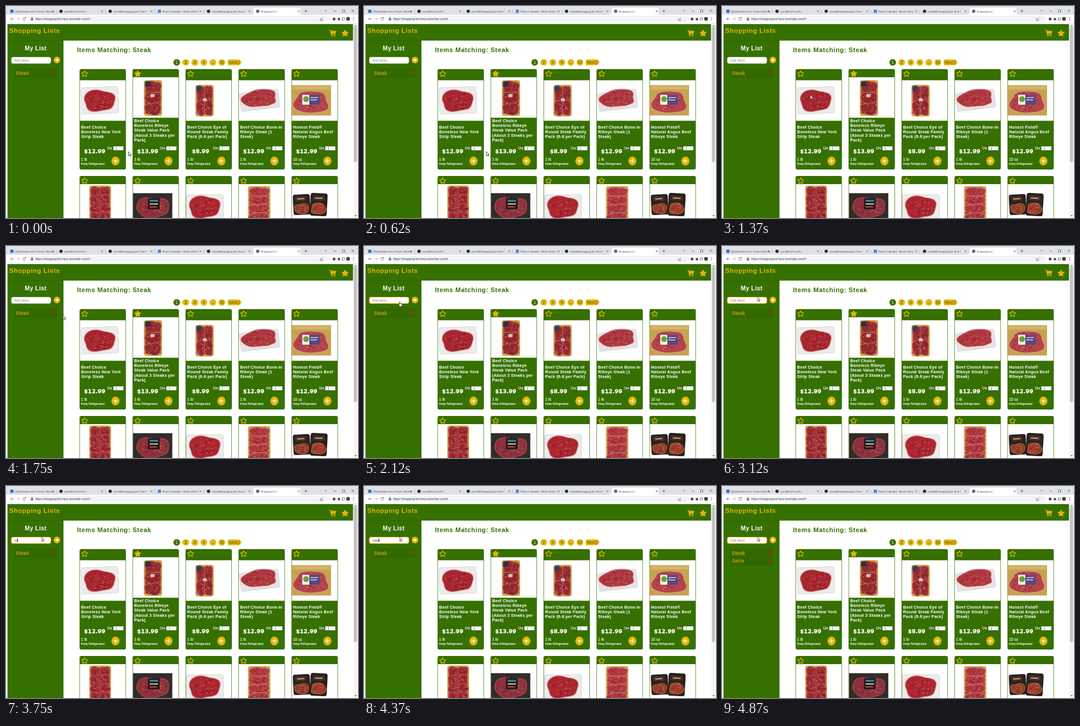
An HTML page for the animation above (4.99 s loop, 600x363 px).

```html
<!DOCTYPE html>
<html lang="en">
<head>
<meta charset="utf-8">
<title>Shopping List</title>
<style>
  html, body { margin: 0; width: 100%; height: 100%; overflow: hidden; background: #fff; }
  svg { display: block; width: 600px; height: 363px; }
  text { font-family: "Liberation Sans", Arial, sans-serif; fill: #fff; white-space: pre; }
  .tab { font-size: 4.4px; fill: #3c4043; }
  .url { font-size: 5.15px; fill: #3a3d40; }
  .brand { font: bold 11px "Liberation Sans", Arial, sans-serif; letter-spacing: .5px; fill: #e3b505; }
  .heading { font: bold 11px "Liberation Sans", Arial, sans-serif; letter-spacing: .5px; fill: #367000; }
  .side { font: bold 10px "Liberation Sans", Arial, sans-serif; letter-spacing: .4px; }
  .item { font-size: 8.3px; letter-spacing: .35px; fill: #e3b505; stroke: #e3b505; stroke-width: .12px; }
  .page { font-size: 7px; fill: #4c5a08; text-anchor: middle; }
  .name { font: bold 7px "Liberation Sans", Arial, sans-serif; letter-spacing: .2px; }
  .price { font: bold 9.4px "DejaVu Sans", Verdana, sans-serif; text-anchor: middle; stroke: #fff; stroke-width: .25px; }
  .qty, .unit, .note { stroke: #fff; stroke-width: .12px; }
  .qty { font-size: 6px; }
  .count { font-size: 5px; fill: #333; }
  .unit { font-size: 6.4px; }
  .note { font-size: 4.7px; letter-spacing: .1px; }
  .line { fill: none; stroke: #5f6368; stroke-width: .8; }
  .star { fill: none; stroke: #e3b505; stroke-width: 1.2; stroke-linejoin: round; }
  .star.on { fill: #e3b505; }
  .cross { stroke: #d8122a; stroke-width: 1.9; }

  #field { position: absolute; left: 14.6px; top: 89px; height: 8px; font: 5.1px/8px "Liberation Sans", Arial, sans-serif; letter-spacing: .2px; color: #333; }
  #hint { position: absolute; left: 0; top: 0; white-space: nowrap; color: #777; }
  #typed { position: absolute; left: 0; top: 0; overflow: hidden; letter-spacing: 0; width: 0; }
  #caret { position: absolute; left: 0; top: 1px; width: .6px; height: 6px; background: #222; }

  /* 40 ticks per loop: one tick is 2.5% */
  .run { animation: 4990ms step-end -5ms infinite; }
  #mouse { animation-name: move; }
  #arrow { animation-name: arrow; }
  #hand { animation-name: hand; }
  #ring { animation-name: ring; }
  #added { animation-name: added; }
  #hint { animation-name: hint; }
  #typed { animation-name: type; }
  #caret { animation-name: caret; }
  @keyframes move {
    0% { transform: translate(208px, 249px); }
    17.5% { transform: translate(208px, 249px); animation-timing-function: steps(4, end); }
    27.5% { transform: translate(150px, 152px); animation-timing-function: steps(5, end); }
    40% { transform: translate(61px, 95px); }
    45% { transform: translate(61px, 95px); animation-timing-function: steps(2, end); }
    50% { transform: translate(62px, 86.5px); }
    60%, 100% { transform: translate(59.5px, 86.5px); }
  }
  @keyframes arrow { 0% { opacity: 1; } 40% { opacity: 0; } 60%, 100% { opacity: 1; } }
  @keyframes hand { 0% { opacity: 0; } 40% { opacity: 1; } 60%, 100% { opacity: 0; } }
  @keyframes ring { 0% { opacity: 0; } 40%, 100% { opacity: 1; } }
  @keyframes added { 0% { opacity: 0; } 92.5%, 100% { opacity: 1; } }
  @keyframes hint { 0% { opacity: 1; } 72.5% { opacity: 0; } 92.5%, 100% { opacity: 1; } }
  @keyframes type {
    0% { width: 0; } 72.5% { width: .222em; } 75% { width: .778em; } 80% { width: 1em; }
    82.5% { width: 1.5em; } 85% { width: 2.06em; } 92.5%, 100% { width: 0; }
  }
  @keyframes caret {
    0% { opacity: 0; left: 0; } 50% { opacity: 1; left: 0; } 60% { opacity: 0; left: 0; }
    70% { opacity: 1; left: 0; } 72.5% { opacity: 1; left: .25em; } 75% { opacity: 1; left: .8em; }
    80% { opacity: 1; left: 1.02em; } 82.5% { opacity: 1; left: 1.52em; } 85% { opacity: 1; left: 2.08em; }
    92.5%, 100% { opacity: 0; left: 0; }
  }
</style>
</head>
<body>
<svg id="page" viewBox="0 0 600 363">
  <rect width="600" height="363" fill="#fff"/>
  <rect width="600" height="15" fill="#dee1e6"/>
  <path d="M420 15q2 0 2-2V5q0-2 2-2h76q2 0 2 2v8q0 2 2 2z" fill="#fff"/>
  <g id="tabs"></g>
  <g class="line">
    <path d="M511 6v5M508.500 8.500h5M543 7l2 2 2-2M558 8.500h4.500M573.500 6.500h4v4h-4zM589 6l4.500 4.500M593.500 6l-4.500 4.500"/>
    <path d="M13 22H8m2-2-2 2 2 2"/>
    <path d="M18 22h5m-2-2 2 2-2 2" opacity=".5"/>
    <path d="M33 20.500a2.400 2.400 0 1 0 .4 2M33.400 19v2h-2"/>
  </g>
  <rect x="38" y="17" width="515" height="10" rx="5" fill="#f1f3f4"/>
  <path d="M42.500 21.500h3.600v3h-3.600z" fill="#5f6368"/>
  <path class="line" d="M43.200 21.500v-1a1.100 1.100 0 0 1 2.200 0v1"/>
  <text class="url" x="50" y="23.600">https://shopping-list-heur.onrender.com/#</text>
  <g class="line">
    <path d="M536 21v3.500h4V23M537.500 22.500l3-3"/>
    <path d="M573 20h4v4h-4z"/>
  </g>
  <g fill="#4a4d50">
    <path d="M557 20.500h1.200a1 1 0 0 1 2 0h1.300v4H557z"/>
    <path d="M565.500 20.500h4v4h-4z"/>
  </g>
  <circle cx="583" cy="22" r="3.200" fill="#4c4440"/>
  <g fill="#5f6368"><circle cx="592.500" cy="19.800" r=".7"/><circle cx="592.500" cy="22" r=".7"/><circle cx="592.500" cy="24.200" r=".7"/></g>
  <path d="M0 29.500h600" stroke="#dfe1e4" stroke-width=".7"/>

  <rect x="592" y="30" width="8" height="333" fill="#f5f5f5"/>
  <rect x="593" y="36" width="5.500" height="231" fill="#c3c3c3"/>
  <path d="M594 35l2-2.500 2 2.500zM594 358l2 2.500 2-2.500z" fill="#777"/>
  <path d="M2.500 31H591.500V59.300H98V363H2.500z" fill="#367000"/>
  <path d="M2.500 59.300H98" stroke="#2d6000" stroke-width=".8"/>
  <text class="brand" x="5.500" y="46">Shopping Lists</text>
  <g fill="#e3b505">
    <path d="M551 41h2.600l.5 1.500h9l-1.500 5.300h-6.400l.3 1.200h6v1.200h-7.200l-1.700-8h-1.600z"/>
    <circle cx="555.700" cy="51.300" r="1.100"/><circle cx="560.800" cy="51.300" r="1.100"/>
  </g>
  <text class="side" x="32" y="76">My List</text>
  <rect x="9" y="87.500" width="67.500" height="11" rx="3" fill="#fff" stroke="#b9c2ad" stroke-width=".5"/>
  <rect id="ring" class="run" x="9" y="87.500" width="67.500" height="11" rx="3" fill="none" stroke="#e3a417" stroke-width="1"/>
  <rect x="14" y="107" width="73" height="16" fill="#326800"/>
  <text class="item" x="16.500" y="117.600">Steak</text>
  <path class="cross" d="M78.400 113.400l3.200 3.200m0-3.200l-3.200 3.200"/>
  <g id="added" class="run">
    <rect x="14" y="122" width="73" height="14" fill="#326800"/>
    <text class="item" x="16.500" y="130.600">Juice</text>
    <path class="cross" d="M78.400 126.400l3.200 3.200m0-3.200l-3.200 3.200"/>
  </g>
  <text class="heading" x="121" y="79">Items Matching: Steak</text>
  <g id="shop"></g>
</svg>
<div id="field">
  <span id="hint" class="run">Add Items</span>
  <span id="typed" class="run">juice</span>
  <span id="caret" class="run"></span>
</div>
<svg style="position:absolute;left:0;top:0" viewBox="0 0 600 363">
  <g id="mouse" class="run" stroke="#222" stroke-width=".7" fill="#fff" stroke-linejoin="round">
    <path id="arrow" class="run" d="M.5.500v7l1.700-1.500 1.100 2.500 1.200-.5-1.100-2.400h2.300z"/>
    <path id="hand" class="run" d="M-.7 1q.7-1 1.400 0v2.500l2.800.8q.8.300.7 1.200l-.5 3H-.2l-2-3q0-1 1.500-.3z"/>
  </g>
</svg>
<script>
  const put = (id, html) => document.getElementById(id).innerHTML += html;
  const text = (cls, x, y, s) => `<text class="${cls}" x="${x}" y="${y}">${s}</text>`;
  const rect = (x, y, w, h, fill, r = 0) =>
    `<rect x="${x}" y="${y}" width="${w}" height="${h}" rx="${r}" fill="${fill}"/>`;
  const tilt = (deg, x, y, s) => `<g transform="rotate(${deg} ${x} ${y})">${s}</g>`;

  function star(cx, cy, r, on) {
    const pts = Array.from({ length: 10 }, (_, i) => {
      const a = i * Math.PI / 5 - Math.PI / 2, d = i % 2 ? r * .5 : r;
      return (cx + d * Math.cos(a)).toFixed(2) + ',' + (cy + d * Math.sin(a)).toFixed(2);
    });
    return `<polygon class="star ${on ? 'on' : ''}" points="${pts.join(' ')}"/>`;
  }

  function plus(cx, cy, rx, ry) {
    const d = rx * .52;
    return `<ellipse cx="${cx}" cy="${cy}" rx="${rx}" ry="${ry}" fill="#e3b505"/>
      <path d="M${cx - d} ${cy}h${2 * d}M${cx} ${cy - d}v${2 * d}" stroke="#fff" stroke-width="1.3"/>`;
  }

  // Wobbly cut of meat with a fat rim, dark grain and pale marbling, all seeded
  function meat(cx, cy, rx, ry, seed, fill = '#a8262f', rim = '#dba39b') {
    let s = seed * 7919;
    const rnd = () => (s = (s * 16807 + 11) % 2147483647) / 2147483647;
    const at = (a, d) => (cx + rx * d * Math.cos(a)).toFixed(1) + ' ' + (cy + ry * d * Math.sin(a)).toFixed(1);
    const edge = Array.from({ length: 40 }, (_, i) => {
      const a = i * Math.PI / 20;
      const k = 1 + .06 * Math.sin(3 * a + seed) + .04 * Math.sin(5 * a + seed * 2);
      return at(a, .93 * k / Math.pow(Math.cos(a) ** 4 + Math.sin(a) ** 4, .12));
    });
    const grain = n => Array.from({ length: n }, () => 'M' + at(rnd() * 6.28, Math.sqrt(rnd()) * .78)
      + `q${(rnd() * 3).toFixed(1)} ${(rnd() * 4 - 2).toFixed(1)} ${(rnd() * 8 - 4).toFixed(1)} ${(rnd() * 6 - 3).toFixed(1)}`).join('');
    const n = 6 + Math.round(rx * ry / 25);
    return `<path d="M${edge.join('L')}Z" fill="${fill}" stroke="${rim}" stroke-width="1.2"/>
      <path d="${grain(n)}" fill="none" stroke="#6f1119" stroke-width="1.8" opacity=".4"/>
      <path d="${grain(n)}" fill="none" stroke="#dc8d89" stroke-width=".8" opacity=".7"/>`;
  }

  const tray = (x, y, w, h, fill = '#ececec', edge = '#cfd0d1', r = 3) =>
    `<rect x="${x}" y="${y}" width="${w}" height="${h}" rx="${r}" fill="${fill}" stroke="${edge}" stroke-width=".8"/>`;

  // Gold-edged pack filled with overlapping cuts
  function pack(x, y, w, h, cols, rows, fill, rim) {
    let cuts = '';
    const cw = (w - 3) / cols, ch = (h - 4) / rows;
    for (let r = 0; r < rows; r++) for (let c = 0; c < cols; c++)
      cuts += meat(x + 1.5 + cw * (c + .5), y + 2 + ch * (r + .5), cw * .54, ch * .58, 2 + r * cols + c, fill, rim);
    return tray(x, y, w, h, '#d3a73f', '#bd9130') + rect(x + 2, y + 3, w - 4, h - 6, fill, 3) + cuts;
  }

  const photos = [
    () => tilt(-2, 160, 162, tray(128.5, 139, 63, 45)) + meat(159, 162, 28, 19.5, 2),
    () => pack(235.5, 127.5, 30, 60, 1, 3, '#93292e', '#b9605c')
      + rect(237, 129, 9, 9, '#23344f', 2) + rect(246, 151, 7, 5, '#d3c3b8'),
    () => pack(323.5, 135.5, 30, 53, 2, 2, '#982a30', '#b9605c')
      + rect(324.5, 137, 9, 8, '#2a4060', 2) + rect(336, 158, 6, 5, '#d6c6ba'),
    () => tilt(-7, 432, 160, tray(399, 146, 66, 31, '#e4e4e8')
      + meat(432, 158, 32, 16, 5, '#b03841', '#e6c6bc'))
      + '<path d="M402 166q12 12 40 8l19-8" fill="none" stroke="#eadcd2" stroke-width="2.2"/>',
    () => rect(486.5, 135.5, 67.5, 52, '#c5a34e') + rect(489, 137, 63, 6, '#d2b56a')
      + meat(520, 165, 31, 20, 6, '#b4434a', '#d79a90') + rect(505, 152, 30, 17, '#f0eff0', 1)
      + rect(517, 152, 18, 17, '#5c4780') + '<circle cx="511.500" cy="159.500" r="5" fill="#6e9f39"/>'
      + rect(519, 156, 13, 1.5, '#d8d0e2') + rect(519, 160, 11, 1.5, '#d8d0e2'),
    () => pack(142.5, 308, 36, 62, 2, 4, '#9a2930', '#b9504f'),
    () => tray(217, 321, 66, 48, '#332c29', '#1a1514', 0) + meat(250, 345, 29, 18, 9, '#8c303c', '#a94f58')
      + rect(242, 329, 20, 19, '#241f1f', 1) + rect(245, 332, 14, 3, '#4a78a8') + rect(245, 338, 14, 2, '#c8bfb4')
      + rect(245, 343, 12, 2, '#b5483f'),
    () => tray(307.5, 323, 63, 44) + meat(338, 344, 28, 20, 2, '#ab262f'),
    () => pack(413, 309, 37, 62, 1, 4, '#ae383d', '#cf7772'),
    () => tilt(-3, 504, 340, tray(490, 323, 28, 34, '#2b211e', '#171210') + meat(504, 347, 13, 9, 4, '#8f3f28', '#a9583a')
        + rect(494, 326, 18, 8, '#433029') + rect(497, 329, 12, 2, '#c79b60'))
      + tilt(3, 533, 340, tray(519, 321, 28, 38, '#2b211e', '#171210') + meat(533, 347, 13, 10, 7, '#9a412a', '#b25c3c')
        + rect(523, 325, 19, 8, '#433029') + rect(526, 328, 13, 2, '#c79b60'))
  ];

  const goods = [
    ['$12.99', '1 lb', 'Beef Choice', 'Boneless New York', 'Strip Steak'],
    ['$13.99', '1 lb', 'Beef Choice', 'Boneless Ribeye', 'Steak Value Pack', '(About 3 Steaks per', 'Pack)'],
    ['$8.99', '1 lb', 'Beef Choice Eye of', 'Round Steak Family', 'Pack (6-8 per Pack)'],
    ['$12.99', '1 lb', 'Beef Choice Bone-In', 'Ribeye Steak (1', 'Steak)'],
    ['$12.99', '10 oz', 'Honest Field®', 'Natural Angus Beef', 'Ribeye Steak']
  ];

  const cardX = i => 125.4 + 90.3 * i;

  function card([price, unit, ...lines], i) {
    const x = cardX(i), tall = lines.length > 3, top = tall ? 122 : 127.2;
    return rect(x, 108, 79, 172, '#367000', 3) + rect(x + .7, top, 77.6, 69.3, '#fff')
      + star(x + 8.7, 116.3, 5.4, tall) + photos[i]()
      + lines.map((s, n) => text('name', x + 2.7, (tall ? 199.2 : 210.2) + n * 8.1, s)).join('')
      + text('price', x + 25.8, 251.8, price)
      + text('qty', x + 46.6, 245.4, 'Qty') + rect(x + 57.7, 240.4, 17, 6.6, '#fff') + text('count', x + 61.5, 245.6, '1')
      + text('unit', x + 2.7, 264.8, unit) + text('note', x + 2.7, 271.8, 'Keep Refrigerated')
      + plus(x + 61.2, 265.4, 7, 7.7);
  }

  function nextCard(i) {
    const x = cardX(i);
    return rect(x, 291, 79, 80, '#367000', 3) + rect(x + .7, 305, 77.6, 60, '#fff')
      + star(x + 8.7, 299.4, 5.4) + photos[i + 5]();
  }

  const tabs = [
    ['#2f6fb0', '(26) Brindlecot Inc: Posts | Meshw'],
    ['#24292e', 'corin482 (Corin B.)'],
    ['#24292e', 'corin482/shopping-list: First f'],
    ['#4a86e0', 'Plover Calendar - Week of Dec'],
    ['#24292e', 'corin482/shopping-list: First f'],
    ['#5f6368', 'Shopping List']
  ];
  put('tabs', tabs.map(([color, title], i) => {
    const x = 10 + i * 83.8, square = i === 0 || i === 3;
    const icon = square ? rect(x - 2.7, 6.3, 5.4, 5.4, color, .5) : `<circle cx="${x}" cy="9" r="2.8" fill="${color}"/>`;
    const split = i < 4 ? `<path d="M${x + 76} 6v6" stroke="#a5a9ae" stroke-width=".5"/>` : '';
    return icon + text('tab', x + 5.3, 10.6, title) + split
      + `<path class="line" d="M${x + 68.5} 7.500l3 3m0-3l-3 3"/>`;
  }).join(''));

  const pages = ['1', '2', '3', '4', '...', '32'].map((s, i) => {
    const x = 291 + i * 15.4;
    return `<circle cx="${x}" cy="96.500" r="5.600" fill="${i ? '#e3b505' : '#367000'}"/>`
      + `<text class="page" x="${x}" y="99"${i ? '' : ' style="fill:#fff"'}>${s}</text>`;
  }).join('');

  put('shop', star(578, 46.8, 5.6, true) + plus(86.8, 92.5, 5.6, 5.8) + pages
    + '<path d="M380 91.500h16.500q2 0 3 2l1.700 3-1.700 3q-1 2-3 2H380q-2 0-2-2.500v-5q0-2.500 2-2.500z" fill="#e3b505"/>'
    + '<text class="page" x="387" y="99">Next</text>'
    + '<path d="M395.500 93.500l3 3-3 3" fill="none" stroke="#4c5a08"/>'
    + goods.map(card).join('') + goods.map((_, i) => nextCard(i)).join(''));
</script>
</body>
</html>
```
